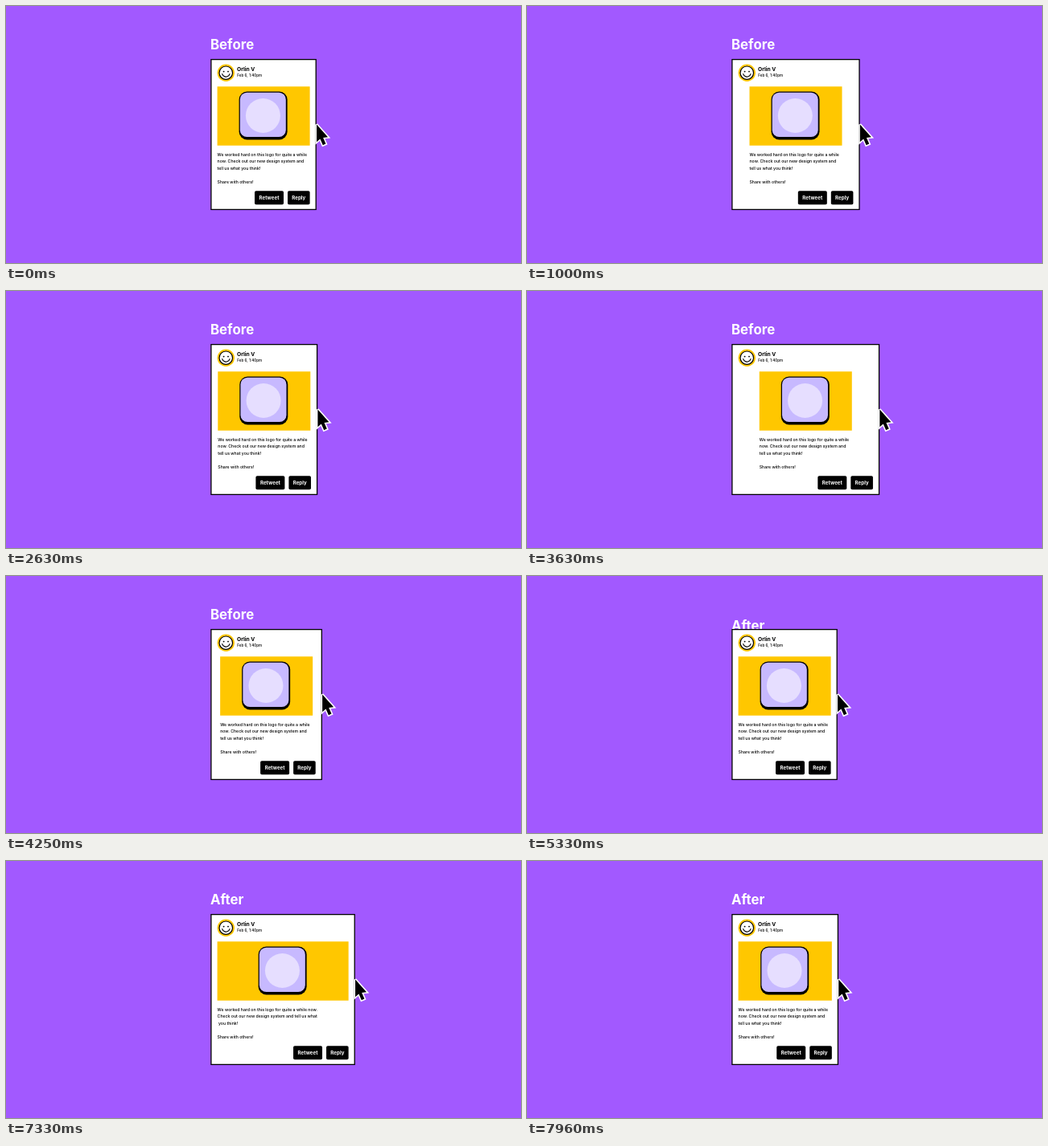
Recreate the animation shown at these times as an HTML page with a canvas. Size 640 px wide and 320 px high, loop 8 s.

```html
<!DOCTYPE html>
<html lang="en">
<head>
<meta charset="utf-8">
<title>Resizing card, before and after</title>
<style>
  html, body { margin: 0; width: 100%; height: 100%; overflow: hidden; background: #a259ff; }
  canvas { display: block; width: 640px; height: 320px; }
</style>
</head>
<body>
<canvas id="stage"></canvas>
<script>
const LOOP = 8000;
const STRETCH = 53.5;
const AFTER_SHIFT = 5585;
const LEFT = 254.9, RIGHT = 385.2;
const YELLOW = '#ffc700', LILAC = '#c7b9ff';

const NARROW = ['We worked hard on this logo for quite a while',
  'now. Check out our new design system and', 'tell us what you think!'];
const WIDE = ['We worked hard on this logo for quite a while now.',
  'Check out our new design system and tell us what', ' you think!'];

const canvas = document.getElementById('stage');
const ctx = canvas.getContext('2d');
const dpr = window.devicePixelRatio || 1;
canvas.width = 640 * dpr;
canvas.height = 320 * dpr;

const clamp = v => Math.min(1, Math.max(0, v));

// cubic-bezier(x1, 0, x2, 1)
function ease(u, x1, x2) {
  u = clamp(u);
  let lo = 0, hi = 1;
  for (let i = 0; i < 24; i++) {
    const s = (lo + hi) / 2, r = 1 - s;
    const x = 3 * x1 * s * r * r + 3 * x2 * s * s * r + s * s * s;
    if (x < u) lo = s; else hi = s;
  }
  return lo * lo * (3 - 2 * lo);
}

function backIn(u) {
  u = clamp(u);
  return u * u * (2.7 * u - 1.7);
}

// How far the card is pulled open, 0 to 1
function pull(t) {
  if (t >= 5000) t -= AFTER_SHIFT;
  if (t < 1500) return ease((t - 400) / 1100, 0.6, 0.5);
  if (t < 2500) return 1 - ease((t - 1500) / 1000, 0.5, 0.5);
  if (t < 3500) return ease((t - 2500) / 1000, 0.5, 0.5);
  return 1 - ease((t - 3500) / 1100, 0.5, 0.4);
}

// Type is laid out large and scaled down to keep fractional advances
function text(str, x, y, size, weight, color = '#000', align = 'left') {
  ctx.save();
  ctx.translate(x, y);
  ctx.scale(size / 100, size / 100);
  ctx.font = weight + ' 100px Inter, "Liberation Sans", sans-serif';
  ctx.textAlign = align;
  ctx.fillStyle = color;
  ctx.fillText(str, 0, 0);
  ctx.restore();
}

function box(x, y, w, h, r, color) {
  ctx.beginPath();
  ctx.roundRect(x, y, w, h, r);
  ctx.fillStyle = color;
  ctx.fill();
}

function disc(x, y, r, color) {
  ctx.beginPath();
  ctx.arc(x, y, r, 0, Math.PI * 2);
  ctx.fillStyle = color;
  ctx.fill();
}

function drawTitle(t) {
  const before = t < 5100;
  const drop = before ? backIn((t - 4570) / 425) : backIn(1 - (t - 5284) / 400);
  if (drop < 1) text(before ? 'Before' : 'After', 254, 54 + 27 * drop, 16.8, 700, '#fff');
}

function drawAvatar() {
  disc(273.3, 83.2, 10.7, YELLOW);
  disc(273.3, 83.2, 8.8, '#000');
  disc(273.3, 83.2, 7.6, '#fff');
  disc(270.6, 81.6, 0.95, '#000');
  disc(276, 81.6, 0.95, '#000');
  ctx.beginPath();
  ctx.arc(273.3, 83.2, 4.9, 0.3, Math.PI - 0.3);
  ctx.lineWidth = 1.1;
  ctx.lineCap = 'round';
  ctx.strokeStyle = '#000';
  ctx.stroke();
}

function drawPicture(x, w) {
  box(x, 100.2, w, 73.6, 0, YELLOW);
  const cx = x + w / 2 - 0.7;
  box(cx - 29.8, 106.5, 60, 60, 10, '#000');
  box(cx - 28.6, 107.8, 57, 55.2, 8.6, LILAC);
  disc(cx, 136.5, 21.5, '#e6deff');
}

function drawButton(label, x, w) {
  box(x, 230.2, w, 17, 1.8, '#000');
  text(label, x + w / 2, 240.8, 6.2, 700, '#fff', 'center');
}

function drawCard(grow, fluid) {
  const edge = RIGHT + grow;
  ctx.fillStyle = '#fff';
  ctx.fillRect(LEFT, 66.6, edge - LEFT, 186.8);
  ctx.lineWidth = 1.3;
  ctx.strokeStyle = '#000';
  ctx.strokeRect(LEFT, 66.6, edge - LEFT, 186.8);

  drawAvatar();
  text('Orlin V', 287.1, 81.2, 6.6, 700);
  text('Feb 6, 1:40pm', 287.2, 88.1, 4.6, 500);

  const x = 262.6 + (fluid ? 0 : grow / 2);
  drawPicture(x, 115 + (fluid ? grow : 0));
  const lines = fluid && grow > 16 ? WIDE : NARROW;
  lines.forEach((line, i) => text(line, x, 186.5 + 8.65 * i, 5.18, 500));
  text('Share with others!', x, 221, 5.18, 500);

  drawButton('Retweet', 309 + grow, 36);
  drawButton('Reply', 350 + grow, 27.6);
}

function drawCursor(x) {
  ctx.save();
  ctx.translate(x, 146);
  ctx.beginPath();
  ctx.moveTo(0.8, 1.6);
  ctx.lineTo(0.8, 23.2);
  ctx.lineTo(5.2, 19.4);
  ctx.lineTo(8.6, 27.2);
  ctx.lineTo(12.2, 25.6);
  ctx.lineTo(8.9, 17.9);
  ctx.lineTo(14.8, 17.3);
  ctx.closePath();
  ctx.lineWidth = 3.2;
  ctx.lineJoin = 'miter';
  ctx.miterLimit = 2.5;
  ctx.strokeStyle = '#fff';
  ctx.stroke();
  ctx.fillStyle = '#000';
  ctx.fill();
  ctx.restore();
}

function draw(t) {
  ctx.setTransform(dpr, 0, 0, dpr, 0, 0);
  ctx.fillStyle = '#a259ff';
  ctx.fillRect(0, 0, 640, 320);
  const grow = STRETCH * pull(t);
  drawTitle(t);
  drawCard(grow, t >= 5100);
  drawCursor(RIGHT + grow);
}

function tick() {
  draw(performance.now() % LOOP);
  requestAnimationFrame(tick);
}
tick();
</script>
</body>
</html>
```
